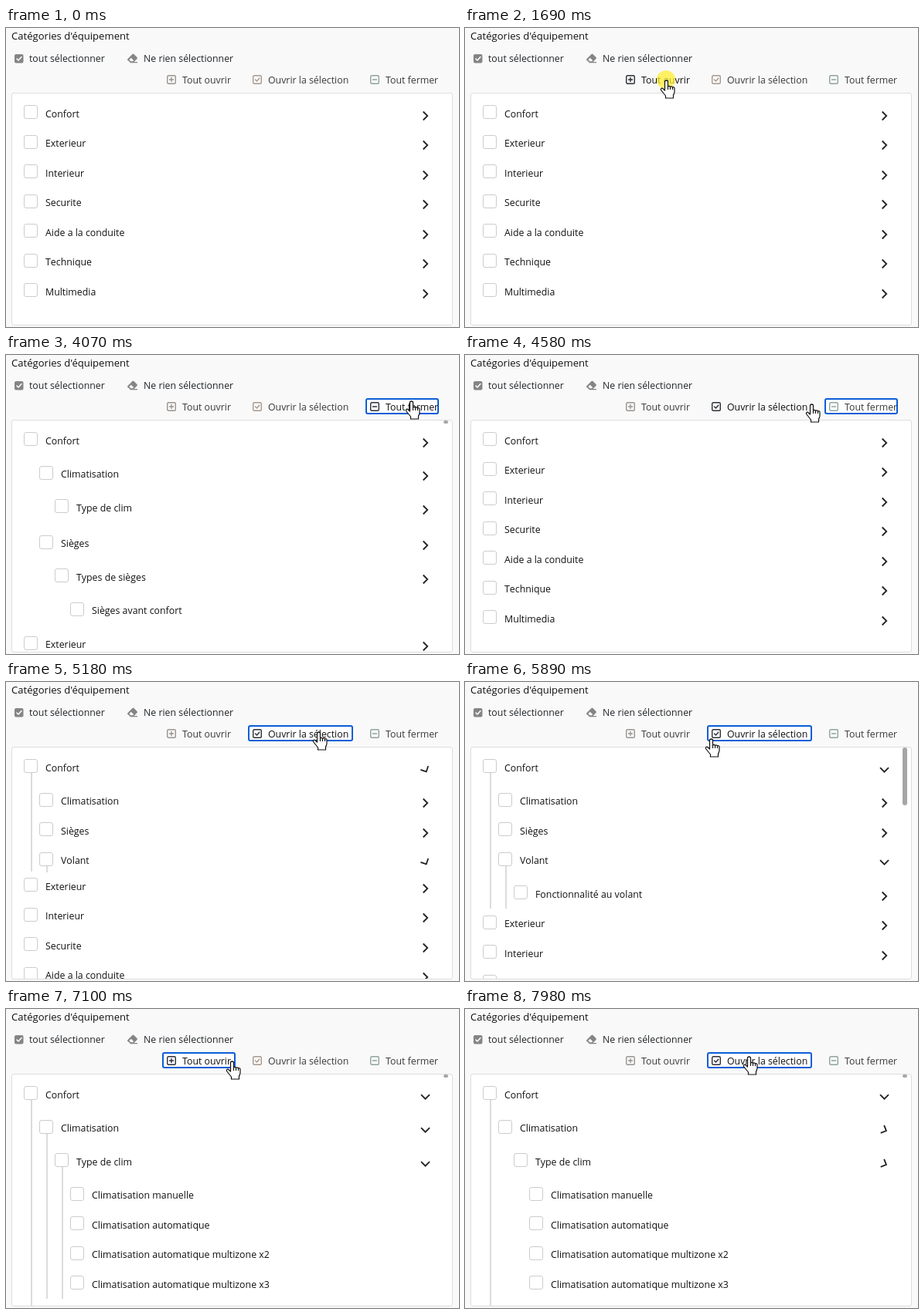
Write an HTML page that moves like this. It is 586 px wide and 388 px high and loops after 8000 ms.

```html
<!DOCTYPE html>
<html lang="fr">
<head>
<meta charset="utf-8">
<title>Catégories d'équipement</title>
<style>
html, body { margin: 0; width: 100%; height: 100%; overflow: hidden; }
body { position: relative; background: #f9f9f9; color: #212529; font: 12.35px/20px "Open Sans", "Noto Sans", sans-serif; }
body > *, .btn > * { position: absolute; white-space: nowrap; }
svg { overflow: visible; fill: none; stroke-linecap: round; stroke-linejoin: round; }
#panel { left: 7px; top: 84px; width: 569px; height: 300px; border: 1px solid #ddd; border-radius: 3px; background: #fff; overflow: hidden; font-kerning: none; }
#tree { position: absolute; left: 15px; right: 27px; top: 7.5px; }
.node { position: relative; }
.row { position: relative; height: 38.5px; line-height: 38.5px; padding-left: 28px; color: #111; }
.box { position: absolute; z-index: 1; left: 0; top: 7.7px; width: 16px; height: 16px; border: 1px solid #ccc; border-radius: 3px; background: #fff; }
.chev { position: absolute; right: 2px; top: 15px; width: 11px; height: 12px; stroke: #222; stroke-width: 1.8; stroke-linecap: butt; stroke-linejoin: miter; }
.line { position: absolute; left: 9px; top: 18px; bottom: 1px; width: 2px; background: #dcdcdc; }
.kids { overflow: hidden; }
.pad { padding: 5px 0 0 20px; }
#thumb { left: 566px; top: 85px; width: 6px; border-radius: 3px; background: #a6a6a6; }
.btn { top: 57px; height: 20px; color: #3a3a3a; }
.btn.hot { color: #111; }
.btn.hot svg { stroke: #2b2f36 !important; }
.btn svg { left: 6px; top: 4px; stroke-width: 1.4; }
.btn span { left: 26px; top: 1px; }
.ring { left: 0; top: -1px; right: 0; bottom: 0; border: 2px solid #0b5ed7; border-radius: 3px; background: #fff; }
#spot { width: 24px; height: 24px; border-radius: 50%; background: rgba(255, 236, 50, .75); }
#cursor { left: 0; top: 0; width: 1px; height: 1px; fill: #fff; stroke: #111; stroke-width: 1.2; }
</style>
</head>
<body>
<div style="left:7px;top:0;font-size:13.1px;color:#111">Catégories d'équipement</div>
<svg width="180" height="50" style="left:0;top:0">
  <rect x="11" y="34" width="11.5" height="11.5" rx="2" fill="#858585"/>
  <path d="M14 40l2 2 4-4.5" stroke="#fff" stroke-width="1.5"/>
  <path d="M157 40.5L163.5 34q1-.8 2 0l4 4q.8 1 0 2L165 44.5h-4.5l-3.500-3z" fill="#858585"/>
  <path d="M159.3 41l2.500-2.300 3.400 3.300-1.200 1.200h-2.600z" fill="#f9f9f9"/>
  <path d="M161 44.7h8.500" stroke="#858585" stroke-width="1.3"/>
</svg>
<div style="left:30px;top:30px">tout sélectionner</div>
<div style="left:178px;top:30px">Ne rien sélectionner</div>
<div id="panel"><div id="tree"></div></div>
<div id="thumb"></div>
<div id="spot"></div>
<svg id="cursor">
  <path id="arrow" d="M0 0V16.500L3.800 13l2.700 6 2.600-1.100L6.500 12H12z"/>
  <path id="hand" transform="translate(.5 1)" d="M-2 1Q0-1 2 1V8q1.500-1.500 3 .3 1.700-1 3 .5 2-.8 2.500 1.200V15Q10 18 9 19v4H-1V20L-7 12.500Q-7.500 9.800-5 10.300L-2 13zM2 8v3.500M5 8.300v3.200M8 8.800v2.700"/>
</svg>
<script>
const LOOP = 8000, ROW = 38.5, PAD = 5, TURN = 230, FOLD = 508, FOLD_WAIT = 155;
const $ = id => document.getElementById(id);
const clamp = v => Math.max(0, Math.min(1, v));
const ease = u => (1 - Math.cos(Math.PI * clamp(u))) / 2;

const outline = `
Confort
 Climatisation
  Type de clim
   Climatisation manuelle
   Climatisation automatique
   Climatisation automatique multizone x2
   Climatisation automatique multizone x3
 Sièges
  Types de sièges
   Sièges avant confort
   Sièges avant sport
   Sièges arrière confort
   Sièges chauffants
   Sièges ventilés
   Sièges massants
  Réglage
   Réglage électrique
  Banquette
 Volant
  Fonctionnalité au volant
   Volant chauffant
   Volant réglable
   Volant multifonction
Exterieur
 Carrosserie
Interieur
 Habitacle
Securite
 Airbags
Aide a la conduite
 Stationnement
Technique
 Moteur
Multimedia
 Audio`;

const root = { kids: [], body: $('tree') };
const nodes = [];

function add(tag, cls, parent, html = '') {
  const el = document.createElement(tag);
  el.className = cls;
  el.innerHTML = html;
  return parent.appendChild(el);
}

const stack = [root];
for (const text of outline.trim().split('\n')) {
  const name = text.trim(), depth = text.length - name.length;
  const parent = stack[depth];
  const el = add('div', 'node', parent.body);
  const node = { name, kids: [] };
  node.line = add('div', 'line', el);
  node.row = add('div', 'row', el, `<i class="box"></i>${name}`);
  node.clip = add('div', 'kids', el);
  node.body = add('div', 'pad', node.clip);
  parent.kids.push(node);
  nodes.push(node);
  stack[depth + 1] = node;
}
for (const n of nodes) {
  if (!n.kids.length) continue;
  n.row.insertAdjacentHTML('beforeend', '<svg class="chev" viewBox="0 0 11 12"><path d="M2.700 .5L8.200 6 2.700 11.500"/></svg>');
  n.chev = n.row.lastChild;
}

const none = () => false;
const all = n => n.kids.length > 0;
const picked = n => n.name === 'Confort' || n.name === 'Volant';

// press: mouse down, go: the tree starts to move
const phases = [
  { press: -1, go: -9999, open: none, btn: -1 },
  { press: 1690, go: 1795, open: all, btn: 0 },
  { press: 3640, go: 3730, open: none, btn: 2 },
  { press: 4900, go: 5035, open: picked, btn: 1 },
  { press: 6330, go: 6457, open: all, btn: 0 },
  { press: 7740, go: 7830, open: picked, btn: 1 }
];

const height = (n, open) => PAD + n.kids.reduce((h, k) => h + ROW + (open(k) ? height(k, open) : 0), 0);

function drawTree(t) {
  const i = phases.findLastIndex(p => p.go <= t);
  const { go, open } = phases[i], before = i ? phases[i - 1].open : none;
  const turn = ease((t - go) / TURN);
  const left = (1 - clamp((t - go - FOLD_WAIT) / FOLD)) ** 3;
  for (const n of nodes) {
    const now = open(n), was = before(n);
    let max = now ? 'none' : '0', angle = now ? 90 : 0;
    if (now && !was) {
      angle = 90 * turn;
      if (turn < 1) max = turn * height(n, open === all ? none : open) + 'px';
    } else if (was && !now) {
      angle = 90 * (1 - turn);
      max = left * height(n, before) + 'px';
    }
    n.clip.style.maxHeight = max;
    n.line.style.display = now ? '' : 'none';
    if (n.chev) n.chev.style.transform = `rotate(${angle}deg)`;
  }
}

const buttons = [
  [202, 95, 'Tout ouvrir', '#9a9490', 'M6 3.500v5M3.500 6h5'],
  [313, 136, 'Ouvrir la sélection', '#a8988c', 'M3.500 6l2 2 3.200-3.800'],
  [465, 95, 'Tout fermer', '#8fa39b', 'M3.500 6h5']
].map(([x, w, label, color, mark]) => {
  const el = add('div', 'btn', document.body,
    `<div class="ring"></div><svg width="12" height="12" style="stroke:${color}"><rect x=".7" y=".7" width="10.6" height="10.6" rx="1.5"/><path d="${mark}"/></svg><span>${label}</span>`);
  el.style.left = x + 'px';
  el.style.width = w + 'px';
  return { el, x, w, ring: el.firstChild };
});
document.body.append($('spot'), $('cursor'));

const path = [
  [500, 407, 318], [1280, 263, 80], [1330, 261, 78], [1390, 260, 67],
  [2690, 260, 67], [2710, 279, 67], [2860, 395, 74], [3030, 522, 61],
  [3310, 522, 61], [3360, 524, 59], [4380, 524, 59], [4470, 492, 62],
  [4690, 404, 64], [5650, 404, 64], [5850, 330, 74], [6050, 273, 68],
  [7040, 273, 68], [7340, 367, 61], [LOOP, 367, 61]
];

function cursorAt(t) {
  const i = Math.max(1, path.findIndex(p => p[0] > t));
  const [t0, x0, y0] = path[i - 1], [t1, x1, y1] = path[i];
  const u = i === 1 ? ease((t - t0) / (t1 - t0)) : clamp((t - t0) / (t1 - t0));
  return [x0 + (x1 - x0) * u, y0 + (y1 - y0) * u];
}

const thumbs = [[0, 0], [2320, 4], [4400, 0], [5540, 75], [7010, 4]];

function draw(t) {
  drawTree(t);
  const [x, y] = cursorAt(t), shown = t >= 500;
  const focus = phases.findLast(p => p.press + 30 <= t || p.press < 0).btn;
  let over = false;
  buttons.forEach((b, i) => {
    const hot = shown && y <= 78 && x >= b.x && x <= b.x + b.w;
    over = over || hot;
    b.el.classList.toggle('hot', hot);
    b.ring.style.display = i === focus ? '' : 'none';
  });
  $('cursor').style.display = shown ? '' : 'none';
  $('cursor').style.transform = `translate(${Math.round(x)}px, ${Math.round(y)}px)`;
  $('hand').style.display = over ? '' : 'none';
  $('arrow').style.display = over ? 'none' : '';
  const pressed = phases.some(p => p.press > 0 && t >= p.press && t < p.press + 110);
  $('spot').style.display = pressed ? '' : 'none';
  $('spot').style.transform = `translate(${x - 12}px, ${y - 12}px)`;
  $('thumb').style.height = thumbs.findLast(k => k[0] <= t)[1] + 'px';
}

const start = performance.now();
function tick() {
  draw((performance.now() - start) % LOOP);
  requestAnimationFrame(tick);
}
tick();
</script>
</body>
</html>
```
